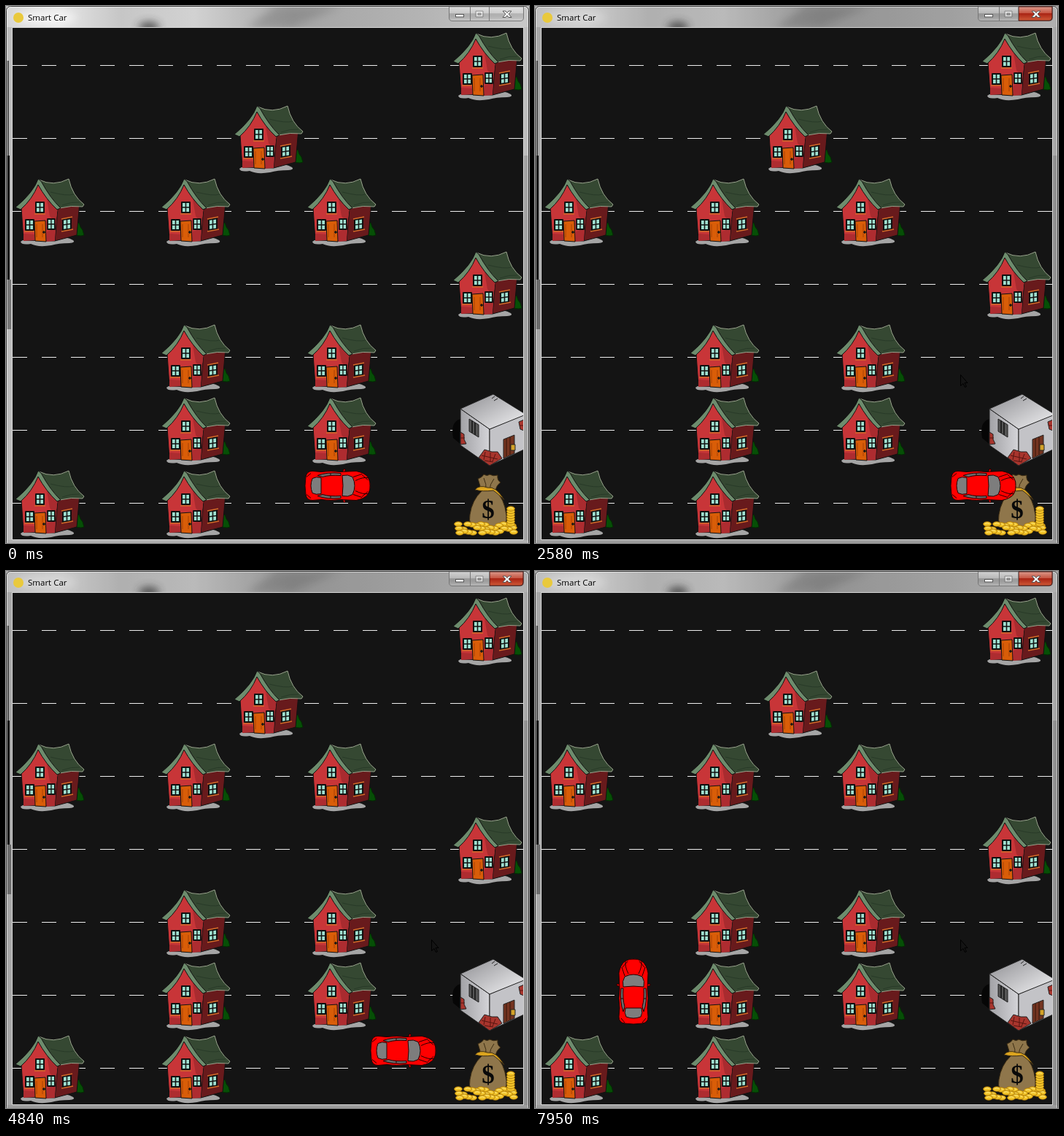
Animation, 717 px wide and 736 px high, one loop 8 s. Source, as an HTML page:

```html
<!DOCTYPE html>
<html lang="en">
<head>
<meta charset="utf-8">
<title>Smart Car</title>
<style>
  html, body { margin: 0; width: 100%; height: 100%; overflow: hidden; background: #141414; }
  svg { display: block; }
  text { font-family: "Open Sans", "Noto Sans", sans-serif; }
</style>
</head>
<body>
<svg width="717" height="736" viewBox="0 0 717 736">
  <defs>
    <linearGradient id="bar">
      <stop offset="0" stop-color="#d6d6d6"/>
      <stop offset=".1" stop-color="#e6e6e6"/>
      <stop offset=".22" stop-color="#c6c6c6"/>
      <stop offset=".36" stop-color="#d2d2d2"/>
      <stop offset=".55" stop-color="#a4a4a4"/>
      <stop offset=".8" stop-color="#b4b4b4"/>
      <stop offset="1" stop-color="#c8c8c8"/>
    </linearGradient>
    <linearGradient id="glass" x2="0" y2="1">
      <stop offset="0" stop-color="#fff" stop-opacity=".5"/>
      <stop offset=".45" stop-color="#fff" stop-opacity=".2"/>
      <stop offset=".5" stop-color="#000" stop-opacity=".08"/>
      <stop offset="1" stop-color="#fff" stop-opacity=".25"/>
    </linearGradient>
    <linearGradient id="red" x2="0" y2="1">
      <stop offset="0" stop-color="#dc9a8c"/>
      <stop offset=".48" stop-color="#c4523f"/>
      <stop offset=".5" stop-color="#a92414"/>
      <stop offset="1" stop-color="#cf5a38"/>
    </linearGradient>
    <linearGradient id="wall">
      <stop offset="0" stop-color="#a2a2a6"/>
      <stop offset="1" stop-color="#d4d4d8"/>
    </linearGradient>
    <linearGradient id="top" x2="1" y2="1">
      <stop offset="0" stop-color="#8e8e92"/>
      <stop offset="1" stop-color="#f2f2f4"/>
    </linearGradient>
    <filter id="blur" x="-50%" y="-100%" width="200%" height="300%"><feGaussianBlur stdDeviation="6"/></filter>
    <clipPath id="field"><rect x="9" y="30" width="700" height="701"/></clipPath>
    <clipPath id="title"><rect x="1" y="1" width="715" height="28"/></clipPath>

    <g id="pane" stroke="#111">
      <path d="M0 0h11v14H0z" fill="#9fe0d0" stroke-width="2"/>
      <path d="M5.5 0v14M0 7h11" stroke-width="1.5"/>
    </g>

    <g id="house" stroke="#111" stroke-linejoin="round">
      <path d="M10 92Q18 86 40 86Q70 83 82 90Q86 93 77 94Q62 94 52 97Q34 100 24 95Q11 97 10 92Z" fill="#a5a5a5" stroke="none"/>
      <path d="M86 68l4-2 2 6 3 4 2 7-4 1-11-1z" fill="#064f06" stroke="#022c02"/>
      <path d="M60 40L91 38L87 83L57 91Z" fill="#681a1c"/>
      <path d="M33 12L11 46L14 90L57 91L61 46Z" fill="#c83538"/>
      <path d="M45 28L61 46L58 66L50 57Z" fill="#a92b2f" stroke="none"/>
      <path d="M14 81l15 1v8l-15 1zM46 78l12-4-1 17-12 1z" fill="#ae2c30" stroke="none"/>
      <path d="M35 7Q55 17 76 6Q81 29 97 41L95 44Q79 42 64 46Q53 34 43 20Z" fill="#354832" stroke="#9aa58e"/>
      <path d="M51 24Q74 30 83 27M67 42Q80 37 91 38" fill="none" stroke="#283a28"/>
      <path d="M34 6Q28 24 3 45L10 48Q26 34 34 14Q45 34 60 48L65 46Q51 33 38 9Z" fill="#6d8c6d"/>
      <path d="M29 64l15-1 1 29-15-1z" fill="#d95d08"/>
      <path d="M32 68v18M40 68v18" stroke="#a84304" fill="none"/>
      <circle cx="42" cy="79" r="1.3" fill="#222"/>
      <use href="#pane" x="31" y="38"/>
      <use href="#pane" x="17" y="62"/>
      <use href="#pane" transform="translate(47 61) scale(.9 1)"/>
      <use href="#pane" transform="translate(68 62) skewY(-8)"/>
      <path d="M66 61l15-3M66 78l16-3M29 54h15M15 78h14" stroke="#d36b28" stroke-width="1.5"/>
    </g>

    <g id="car" stroke="#200" stroke-width="1" stroke-linejoin="round">
      <path d="M51 5l2-5h2v6zM51 41l2 5h2v-6z" fill="#d00"/>
      <path d="M1 11Q2 3 10 3L22 4Q36 2 48 4L70 3Q81 5 86 11Q90 18 89 23Q90 28 86 35Q81 41 70 43L48 42Q36 44 22 42L10 43Q2 43 1 35Q-1 23 1 11Z" fill="#f00"/>
      <path d="M10 13Q15 10 22 12V34Q15 36 10 33Q6 23 10 13Z" fill="#7d7d7d"/>
      <path d="M51 9Q59 7 65 11Q71 23 65 35Q59 39 51 37Q53 23 51 9Z" fill="#7d7d7d"/>
      <path d="M17 9Q30 4 49 6L49 9Q34 8 24 11ZM17 37Q30 42 49 40L49 37Q34 38 24 35Z" fill="#6a6a6a"/>
      <path d="M35 6v3M35 37v3M66 11l12-4M66 35l12 4M69 16q10-5 17-4M69 30q10 5 17 4M78 8l8 7M78 38l8-7M2 11l6-5M2 35l6 5" fill="none"/>
    </g>

    <g id="coin" stroke="#a8740a" stroke-width=".8">
      <ellipse rx="5.5" ry="3.2" fill="#f2c428"/>
      <path d="M-3-.6Q0-2 3-.6" stroke="#fff3a0" fill="none"/>
    </g>
  </defs>

  <rect width="717" height="736" fill="#bdbdbd"/>
  <rect x="710" y="205" width="7" height="531" fill="#a2a2a2"/>
  <path d="M0 75h4v130H0z" fill="#555"/>
  <path d="M0 205h5v170H0z" fill="#070707"/>
  <path d="M0 375h7v68H0z" fill="#777"/>
  <rect y="732" width="717" height="4" fill="#b0b0b0"/>
  <g clip-path="url(#title)">
    <rect width="717" height="30" fill="url(#bar)"/>
    <ellipse cx="196" cy="29" rx="14" ry="7" fill="#333" opacity=".8" filter="url(#blur)"/>
    <path d="M330 30L370 0H460L390 30Z" fill="#777" opacity=".45" filter="url(#blur)"/>
    <ellipse cx="55" cy="16" rx="42" ry="9" fill="#fff" opacity=".65" filter="url(#blur)"/>
  </g>
  <g id="focus">
    <path d="M0 0H717V736H0ZM9 30V731H709V30Z" fill="#333" fill-rule="evenodd" opacity=".15"/>
  </g>
  <rect x=".5" y=".5" width="716" height="740" rx="6" fill="none" stroke="#3c3c3c"/>
  <path d="M1.5 736V7Q1.5 1.5 7 1.5H710Q715.5 1.5 715.5 7V736" fill="none" stroke="#fff" opacity=".55"/>
  <circle cx="17" cy="16" r="7" fill="#e9c93c"/>
  <text x="30" y="20" font-size="11.5">Smart Car</text>

  <path id="buttons" d="M607.5 1V16Q607.5 20.5 612 20.5H705Q709.5 20.5 709.5 16V1Z" fill="url(#glass)" stroke="#777"/>
  <path id="close" d="M663 1V20H705Q709 20 709 16V1Z" fill="url(#red)" stroke="#4a1510"/>
  <path d="M636.5 1V20M662.5 1V20" stroke="#777"/>
  <g fill="#fff" stroke="#555">
    <rect x="616.5" y="11.5" width="11" height="3.5"/>
    <path d="M644 7h10v8h-10zm3 3v2h4v-2z" fill-rule="evenodd" opacity=".55"/>
    <path d="M681 7h4l2 2.500 2-2.500h4l-4 4 4 4.500h-4l-2-2.500-2 2.500h-4l4-4.500z"/>
  </g>

  <rect x="8.500" y="29.500" width="701" height="702" fill="#141414" stroke="#d6d6d6"/>
  <g id="town" clip-path="url(#field)">
    <path d="M623 566Q609 570 613 592L626 603Z" fill="#060606"/>
    <g stroke="#222" stroke-linejoin="round">
      <path d="M623 552L663 580V630L623 602Z" fill="url(#wall)"/>
      <path d="M663 580L710 560V608L663 630Z" fill="#c3c3c7"/>
      <path d="M668 532L710 558V561L663 580L623 552Z" fill="url(#top)"/>
      <path d="M635 566l13 8v17l-13-8z" fill="#555"/>
      <path d="M639 568v17M643 571v17" stroke-width="2"/>
      <path d="M682 594l15-6v25l-15 7z" fill="#743420"/>
      <path d="M686 593v24M691 591v24" stroke="#351409"/>
      <path d="M692 601h6v8h-6z" fill="#d4a228"/>
      <path d="M648 619l8-11 10 3 8 0 6 9-17 10z" fill="#a8352d"/>
      <path d="M623 584l5 3v7l3 6-8 1zM703 570l7-3v15l-5-2z" fill="#a8352d"/>
      <path d="M652 616l22 5M657 611l-2 11M664 612v13M671 614l-4 10M656 623l12 2M623 592h6M704 575h6" stroke="#561510" fill="none"/>
      <path d="M666 538l4-3M669 541l5-3" fill="none"/>
    </g>
    <g id="bag" stroke="#3c2c12" stroke-linejoin="round">
      <path d="M652 665Q648 651 647 648Q653 646 655 642Q660 645 663 642Q668 645 674 643Q673 650 678 653Q672 657 671 665Q683 674 686 698Q688 714 673 715H647Q633 714 636 697Q639 677 652 665Z" fill="#8f764b"/>
      <path d="M655 647q4 9 3 16M669 648q-6 8-6 15" fill="none"/>
      <path d="M643 663Q649 656 660 660Q672 658 683 677Q674 668 668 664Q653 666 643 663Z" fill="#dca51f"/>
      <text x="661" y="702" font-size="35" text-anchor="middle" fill="#090909" stroke="none" style="font-family:'Liberation Serif',serif;font-weight:bold">$</text>
    </g>
  </g>
  <path id="cursor" d="M583.500 505.500v15l3.500-3 2.500 5 2-1-2.500-5h4z" fill="#141414" stroke="#000"/>
  <g clip-path="url(#field)"><use id="mover" href="#car"/></g>
</svg>
<script>
const NS = 'http://www.w3.org/2000/svg';
const $ = id => document.getElementById(id);

function add(parent, tag, attrs, before = null) {
  const el = document.createElementNS(NS, tag);
  for (const k in attrs) el.setAttribute(k, attrs[k]);
  parent.insertBefore(el, before);
}

const town = $('town'), first = town.firstChild;
for (let y = 81.5; y < 700; y += 100)
  add(town, 'path', { d: `M9 ${y}H709`, stroke: '#eee', 'stroke-dasharray': '20 20' }, first);
// Columns of the houses in each row
['6', '3', '024', '6', '24', '24', '02'].forEach((cols, row) => {
  for (const c of cols) add(town, 'use', { href: '#house', x: 10 + 100 * c, y: 31 + 100 * row });
});
const coin = (x, y) => add(town, 'use', { href: '#coin', x, y });
for (let i = 0; i < 30; i++) coin(620 + i * 37 % 80, 710 + Math.floor(i / 10) * 5 + i % 3);
for (let y = 710; y > 688; y -= 3.5) coin(692, y);

// [time, distance along the route, drawn steps since the previous entry]
const keys = [
  [0, 910, 1], [272, 1080, 4], [340, 40, 1], [530, 90, 1], [1070, 360, 5], [1210, 430, 1],
  [1370, 490, 1], [2080, 820, 6], [2440, 1000, 3], [2580, 1070, 1], [2720, 1110, 1],
  [2837, 70, 1], [3420, 350, 5], [3800, 530, 3], [3940, 600, 1], [4190, 710, 2],
  [4840, 1000, 5], [5090, 1100, 2], [5210, 40, 1], [5580, 170, 3], [6200, 460, 5],
  [6410, 570, 2], [7050, 860, 5], [7443, 1060, 3], [7570, 0, 1], [7950, 110, 3]
];
const steps = [];
keys.forEach(([t, s, n], i) => {
  const [t0, s0] = keys[i - 1] || [t, s];
  for (let k = 1; k <= n; k++) steps.push([t0 + (t - t0) * k / n, s0 + (s - s0) * k / n]);
});

// Two ways in (from the left or from below) join at distance 310
function place(s, below) {
  if (s >= 810) return [s - 500, 630, 0];
  if (s >= 510) return [310, s - 180, 90];
  if (s >= 310) return [s - 200, 330, 0];
  if (below) return [110, 640 - s, -90];
  return s < 110 ? [s, 130, 0] : [110, s + 20, 90];
}

function draw(t) {
  const [at, s] = steps.findLast(step => step[0] <= t + 0.01);
  const [x, y, turn] = place(Math.round(s / 10) * 10, at > 5200);
  const [dx, dy] = turn === 0 ? [45, 27.5] : turn > 0 ? [23.5, 47] : [25, 46];
  $('mover').setAttribute('transform', `translate(${x + dx} ${y + dy}) rotate(${turn}) translate(-45 -23)`);
  const active = Math.min(1, Math.max(0, (at - 2080) / 360));
  $('close').setAttribute('opacity', active);
  $('focus').setAttribute('opacity', active);
  $('cursor').setAttribute('opacity', at < 530 ? 0 : 1);
}

const start = performance.now();
function tick() {
  draw((performance.now() - start) % 8000);
  requestAnimationFrame(tick);
}
draw(0);
tick();
</script>
</body>
</html>
```
